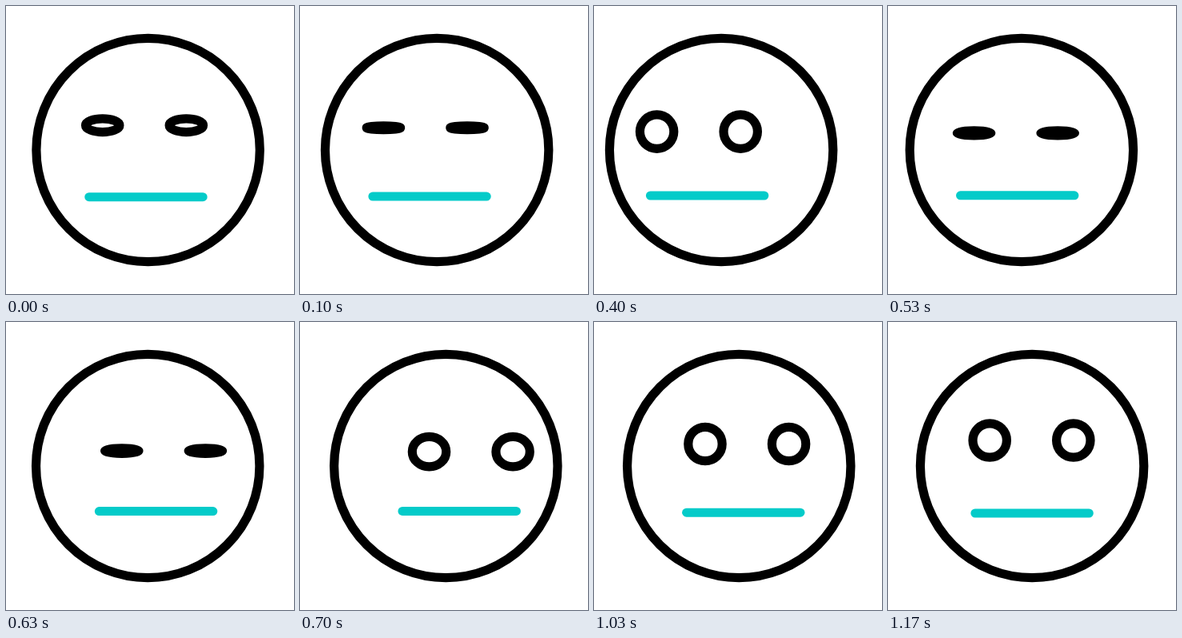
Recreate the animation shown at these times as an HTML page. Size 360 by 360 pixels, loop 1.67 s.

```html
<!DOCTYPE html>
<html lang="en">
<head>
<meta charset="utf-8">
<title>Blinking face</title>
<style>
  html, body { margin: 0; width: 100%; height: 100%; overflow: hidden; background: #fff; }
  svg { display: block; width: 100vw; height: 100vh; }
</style>
</head>
<body>
<svg viewBox="0 0 360 360" fill="none" stroke="#000" stroke-width="11.2">
  <circle id="head" cy="180" r="139.7"/>
  <ellipse class="eye" rx="21.2"/>
  <ellipse class="eye" rx="21.2"/>
  <path id="mouth" d="M-71.2 0H71.2" stroke="#04cbc9" stroke-width="11" stroke-linecap="round"/>
</svg>
<script>
const LOOP = 1670, FPS = 30;
const EYE_GAP = 104.6, EYE_OPEN = 21.2, EYE_SHUT = 2.4;

// Poses: at rest, looking left, looking right, at rest
const poses = {
  headX: [180.1, 159.1, 183.7, 180.1],
  eyeX: [127.2, 78.6, 164.4, 127.2],
  eyeY: [148, 157.1, 162.3, 148],
  mouthX: [180.1, 141.6, 201.2, 180.1],
  mouthY: [239, 237, 236.4, 239]
};

// Start and end of each move, in ticks of 1/30 s
const moves = [[-2.75, 9.25], [12.1, 22.1], [24.75, 34.75]];
const headMoves = [[-2.75, 10], [12.1, 22.5], [24.75, 34.75]];
const blinks = [-2.75, 12.1];

const head = document.getElementById("head");
const eyes = document.querySelectorAll(".eye");
const mouth = document.getElementById("mouth");

function ease(tick, start, end) {
  const x = Math.min(1, Math.max(0, (tick - start) / (end - start)));
  return x * x * (3 - 2 * x);
}

function follow(values, spans, tick) {
  return spans.reduce(
    (sum, [start, end], i) => sum + (values[i + 1] - values[i]) * ease(tick, start, end),
    values[0]);
}

function eyeHeight(tick) {
  const shut = blinks.reduce(
    (sum, s) => sum + ease(tick, s, s + 4.4) - ease(tick, s + 6.5, s + 9.6), 0);
  return EYE_OPEN + (EYE_SHUT - EYE_OPEN) * shut;
}

function draw(ms) {
  const tick = Math.floor((Math.floor(ms / 10) * 10 + 5) * FPS / 1000);
  const at = name => follow(poses[name], moves, tick);

  head.setAttribute("cx", follow(poses.headX, headMoves, tick));
  eyes.forEach((eye, i) => {
    eye.setAttribute("cx", at("eyeX") + i * EYE_GAP);
    eye.setAttribute("cy", at("eyeY"));
    eye.setAttribute("ry", eyeHeight(tick));
  });
  mouth.setAttribute("transform", `translate(${at("mouthX")} ${at("mouthY")})`);
}

const begin = performance.now();
function loop() {
  draw((performance.now() - begin) % LOOP);
  requestAnimationFrame(loop);
}
loop();
</script>
</body>
</html>
```
